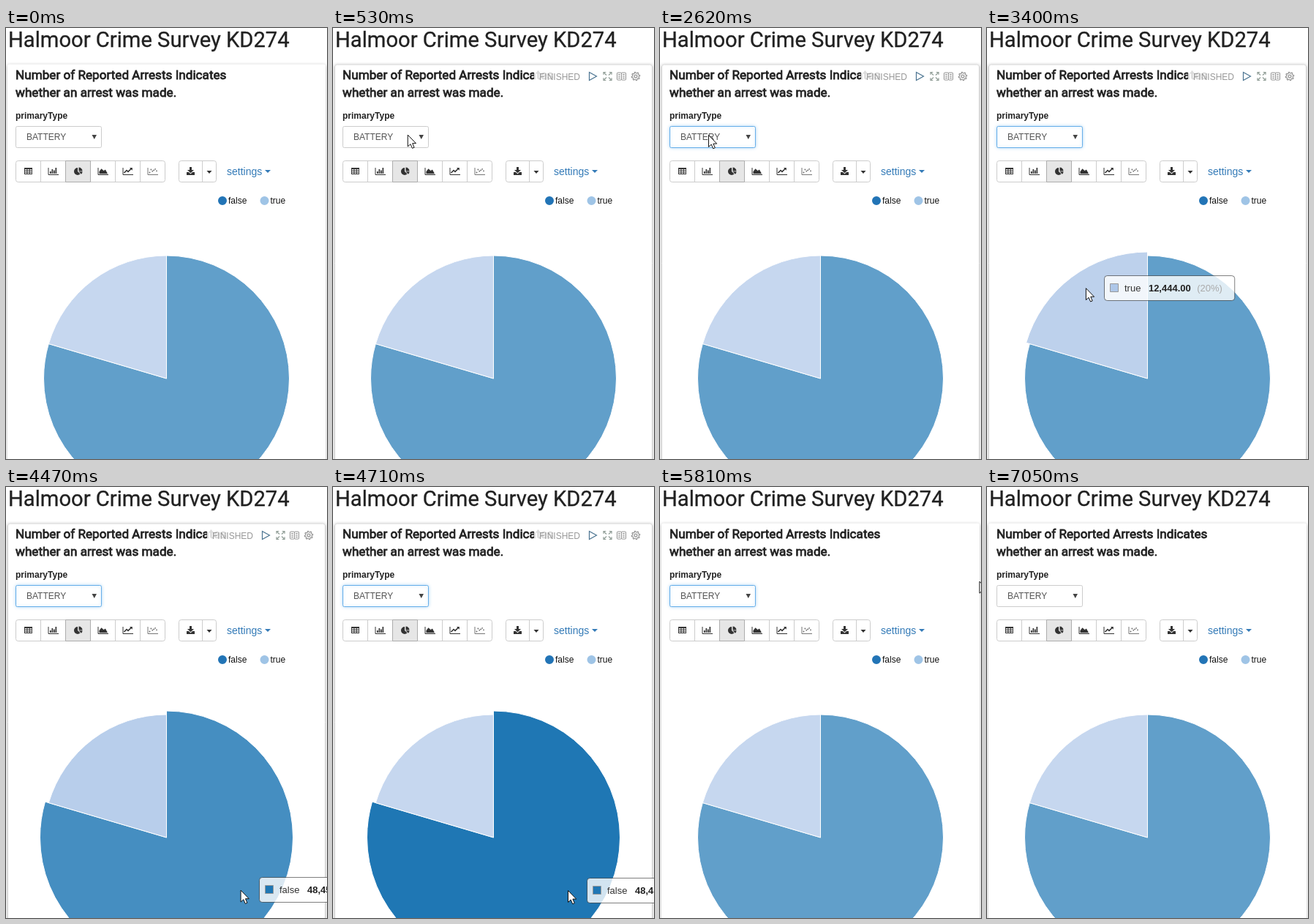
Write an HTML page with a canvas that moves like this. It is 439 px wide and 589 px high and loops after 7110 ms.

```html
<!DOCTYPE html>
<html lang="en">
<head>
<meta charset="utf-8">
<title>Arrest chart</title>
<style>
html, body { margin: 0; width: 100%; height: 100%; overflow: hidden; background: #fff; }
canvas { display: block; }
</style>
</head>
<body>
<canvas id="stage" width="439" height="589"></canvas>
<script>
const ctx = document.getElementById('stage').getContext('2d');
const LOOP = 7110, TICK = 76;
const ARIAL = '"Liberation Sans", Arial, sans-serif';
const ROBOTO = 'Roboto, sans-serif';
const INK = '#333', TITLE = '#212121', LINK = '#337ab7', LINE = '#ccc';

// Events in ms
const ENTER = 70, OPEN = 1370, PICK = 2620, OVER_TRUE = 3300, OVER_FALSE = 4375, OFF_PIE = 5530, LEAVE = 5800;

// Spans in which the screen refreshes once per tick
const BURSTS = [[70, 760], [840, 990], [1300, 1450], [3170, 3540], [4330, 4710], [5410, 5880], [6970, 7050]];

// Pointer legs: easing out from wherever the previous leg ended
const LEGS = [
  { from: 70, to: 760, x: 60, y: 131, power: 2 },
  { from: 840, to: 990, x: 66, y: 146, power: 2 },
  { from: 3170, to: 3540, x: 148, y: 395, power: 2 },
  { from: 4330, to: 4490, x: 321, y: 551, power: 2 },
  { from: 5410, to: 5645, x: 389.5, y: 306, power: 1.4 },
  { from: 5645, to: 5880, x: 460, y: 40, power: 1 }
];

const ramp = (t, from, span) => Math.min(1, Math.max(0, (t - from) / span));
const between = (t, on, off, span) => ramp(t, on, span) - ramp(t, off, span);

function sampleTime(t) {
  const burst = BURSTS.find(([start, end]) => t >= start && t < end);
  if (!burst) return t;
  const span = burst[1] - burst[0];
  const step = span / Math.round(span / TICK);
  return burst[0] + Math.floor((t - burst[0] + 14) / step) * step;
}

function pointer(t) {
  let x = 436, y = 262;
  for (const leg of LEGS) {
    const k = 1 - (1 - ramp(t, leg.from, leg.to - leg.from)) ** leg.power;
    x += (leg.x - x) * k;
    y += (leg.y - y) * k;
  }
  return [x, y];
}

function text(s, x, y, font, color, bolder = 0) {
  ctx.font = font;
  ctx.fillStyle = ctx.strokeStyle = color;
  ctx.fillText(s, x, y);
  if (bolder) {
    ctx.lineWidth = bolder;
    ctx.strokeText(s, x, y);
  }
}

function paint(fill, stroke, width = 1) {
  if (fill) { ctx.fillStyle = fill; ctx.fill(); }
  if (stroke) { ctx.lineWidth = width; ctx.strokeStyle = stroke; ctx.stroke(); }
}

function box(x, y, w, h, r, fill, stroke) {
  ctx.beginPath();
  ctx.roundRect(x, y, w, h, r);
  paint(fill, stroke);
}

function rect(x, y, w, h, color) {
  ctx.fillStyle = color;
  ctx.fillRect(x, y, w, h);
}

function trace(points, close) {
  ctx.beginPath();
  points.forEach(([x, y]) => ctx.lineTo(x, y));
  if (close) ctx.closePath();
}

function shape(points, fill, stroke, width) {
  trace(points, true);
  paint(fill, stroke, width);
}

function line(points, color, width) {
  trace(points, false);
  paint(null, color, width);
}

function wedge(x, y, r, from, to, fill, stroke) {
  ctx.beginPath();
  ctx.moveTo(x, y);
  ctx.arc(x, y, r, from, to);
  ctx.closePath();
  paint(fill, stroke);
}

const disc = (x, y, r, color) => wedge(x, y, r, 0, Math.PI * 2, color);
const caret = (x, y, w, h, color) => shape([[x, y], [x + w, y], [x + w / 2, y + h]], color);

function card(hover) {
  ctx.save();
  ctx.shadowColor = 'rgba(0,0,0,.3)';
  ctx.shadowBlur = 4;
  ctx.shadowOffsetY = 1;
  box(2, 49.5, 435, 600, 3, '#fff');
  ctx.restore();
  if (hover) box(2.5, 50, 434, 600, 3, '#fff', '#d4d4d4');
}

function expandIcon(x, y, color) {
  for (const sx of [-1, 1]) for (const sy of [-1, 1]) {
    const at = (dx, dy) => [x + sx * dx, y + sy * dy];
    line([at(1.5, 1.5), at(5, 5)], color, 1.1);
    line([at(2.2, 5.5), at(5.5, 5.5), at(5.5, 2.2)], color, 1.2);
  }
}

function bookIcon(x, y, color) {
  for (const left of [x - 6, x]) {
    box(left, y - 5, 6, 10, 1, null, color);
    for (let row = -1; row < 2; row++) rect(left + 1.5, y - 0.5 + row * 2.4, 3, 1, color);
  }
}

function gearIcon(x, y, color) {
  const teeth = Array.from({ length: 32 }, (_, i) => {
    const a = (i + 0.5) * Math.PI / 16, r = i % 4 < 2 ? 4.2 : 5.7;
    return [x + r * Math.cos(a), y + r * Math.sin(a)];
  });
  shape(teeth, null, color, 1.2);
  ctx.beginPath();
  ctx.arc(x, y, 1.9, 0, 7);
  ctx.stroke();
}

function controls() {
  rect(275, 54, 150, 24, 'rgba(255,255,255,.84)');
  text('FINISHED', 282, 71, '12px ' + ARIAL, '#999');
  shape([[350.5, 60.5], [360.5, 66], [350.5, 71.5]], null, '#4a7390', 1.2);
  expandIcon(375.5, 66, '#8d9a93');
  bookIcon(394.5, 66, '#929292');
  gearIcon(414, 66, '#959595');
}

function select(focus) {
  ctx.save();
  ctx.shadowColor = `rgba(102,175,233,${0.45 * focus})`;
  ctx.shadowBlur = 4;
  const mix = (a, b) => Math.round(a + (b - a) * focus);
  box(13.5, 134.5, 117, 29, 2, '#fff', `rgb(${mix(204, 102)},${mix(204, 175)},${mix(204, 233)})`);
  ctx.restore();
  text('BATTERY', 28, 153, '12px ' + ARIAL, '#555');
  caret(117.5, 146, 6.5, 6, '#444');
}

function options() {
  box(13.5, 164.5, 130, 97, 0, '#fff', '#6f9bd8');
  rect(14, 197, 129, 32, '#1e90ff');
  ['THEFT', 'BATTERY', 'CRIMINAL DAMAGE'].forEach((s, i) =>
    text(s, 28, 185 + 32 * i, '12px ' + ARIAL, i === 1 ? '#fff' : '#555'));
}

// Each icon is drawn around its own centre
const ICONS = [
  function table() {
    rect(-5.5, -5, 11, 9, INK);
    for (let c = 0; c < 3; c++) for (let r = 0; r < 3; r++)
      rect(-4.5 + c * 3.4, -3 + r * 2.3, 2.4, 1.4, '#fff');
  },
  function bars() {
    axes(INK);
    [3, 6, 4.5, 8].forEach((h, i) => rect(-4.5 + i * 2.5, 3 - h, 1.7, h, INK));
  },
  function pieChart() {
    wedge(-0.5, 0, 5, Math.PI / 4, Math.PI * 1.5, INK);
    wedge(1, -0.5, 5, -Math.PI / 2, 0, INK);
    wedge(1, 0.3, 5, 0, Math.PI / 4, INK);
  },
  function area() {
    axes(INK);
    shape([[-5, 3.3], [-5, 0], [-2, -3.7], [1, -1], [3.5, -2.5], [6.5, 3.3]], INK);
  },
  function trend() {
    axes(INK);
    line([[-5, 2], [-1.5, -1.5], [0.5, 0.3], [5, -4]], INK, 1.6);
    shape([[2.5, -5], [6.3, -5], [6.3, -1.2]], INK);
  },
  function scatter() {
    axes('#777');
    for (let i = 0; i < 6; i++) disc(-4 + i * 1.9, -0.5 - i * 0.4 + 2 * Math.cos(i * 2.6), 0.9, '#666');
  }
];

function axes(color) {
  line([[-6.5, -5], [-6.5, 4.5], [7.5, 4.5]], color);
}

function toolbar() {
  box(13.5, 181.5, 204, 29, 3, '#fff', LINE);
  for (let i = 1; i < ICONS.length; i++) rect(13 + 34 * i, 182, 1, 29, LINE);
  box(81.5, 181.5, 34, 29, 0, '#e6e6e6', '#adadad');
  ICONS.forEach((icon, i) => {
    ctx.save();
    ctx.translate(30.5 + 34 * i, 196);
    icon();
    ctx.restore();
  });

  box(236.5, 181.5, 51, 29, 3, '#fff', LINE);
  rect(268, 182, 1, 29, LINE);
  rect(247, 197, 11, 4, INK);
  caret(248.5, 195.5, 8, 4, '#fff');
  rect(251, 190, 3, 4, INK);
  caret(248, 194, 9, 4.3, INK);
  caret(274.5, 195, 7, 4, INK);
  text('settings', 302, 201, '14px ' + ARIAL, LINK);
  caret(354, 194, 8, 4, LINK);
}

function legend() {
  [['false', 296, '#2274b6'], ['true', 353.5, '#9fc4e6']].forEach(([name, x, color]) => {
    disc(x, 236, 6, color);
    text(name, x + 8, 240, '12px ' + ARIAL, '#111');
  });
}

function pie(t) {
  const top = -Math.PI / 2;
  const split = top - 73.6 * Math.PI / 180;
  const slice = (from, to, rgb, on, off) => wedge(219.5, 479, 168 + 5 * between(t, on, off, 70), from, to,
    `rgba(${rgb},${0.7 + 0.3 * between(t, on, off, 250)})`, '#fff');
  slice(top, split + Math.PI * 2, '31,119,180', OVER_FALSE, OFF_PIE);
  slice(split, top, '174,199,232', OVER_TRUE, OVER_FALSE);
}

function tooltip(t) {
  const [px, py] = pointer(Math.min(t, OFF_PIE));
  const x = Math.round(px + 25.5), y = Math.round(py - 17.5);
  const [label, value, share, color] = t < OVER_FALSE
    ? ['true', '12,444.00', '(20%)', '#aec7e8']
    : ['false', '48,451.00', '(80%)', '#1f77b4'];
  const bold = 'bold 13px ' + ARIAL, plain = '13px ' + ARIAL;
  ctx.font = plain;
  const valueX = x + 38.5 + ctx.measureText(label).width;
  ctx.font = bold;
  const shareX = valueX + ctx.measureText(value).width + 8.5;
  box(x + 0.5, y + 0.5, shareX + 51 - x, 34, 4, 'rgba(255,255,255,.8)', 'rgba(0,0,0,.5)');
  box(x + 8.5, y + 11.5, 11, 11, 0, color, '#999');
  text(label, x + 28, y + 22, plain, INK);
  text(value, valueX, y + 22, bold, '#222');
  text(share, shareX, y + 22, plain, '#aaa');
}

function arrow(t) {
  const [x, y] = pointer(t);
  const outline = [[0, 0], [0, 16], [3.7, 12.6], [6.2, 18.3], [8.8, 17.2], [6.4, 11.6], [11.2, 11.6]];
  shape(outline.map(([dx, dy]) => [x + 0.5 + dx, y + 0.5 + dy]), '#fff', '#111');
}

function draw(t) {
  const hover = t >= ENTER && t < LEAVE;
  rect(0, 0, 439, 589, '#fff');
  text('Halmoor Crime Survey KD274', 3, 26, '29.2px ' + ROBOTO, TITLE, 0.3);
  card(hover);
  ['Number of Reported Arrests Indicates', 'whether an arrest was made.'].forEach((s, i) =>
    text(s, 13, 70 + 24 * i, '17.15px ' + ROBOTO, TITLE, 0.8));
  if (hover) controls();
  text('primaryType', 13, 124, 'bold 12px ' + ARIAL, TITLE);
  toolbar();
  select(between(t, 1300, 6970, 80));
  legend();
  pie(t);
  if (t >= OPEN && t < PICK) options();
  if (t >= OVER_TRUE && t < OFF_PIE + 200) tooltip(t);
  if (t >= ENTER && t < 5880) arrow(t);
}

const begin = performance.now();
function frame() {
  draw(sampleTime((performance.now() - begin) % LOOP));
  requestAnimationFrame(frame);
}
frame();
</script>
</body>
</html>
```
